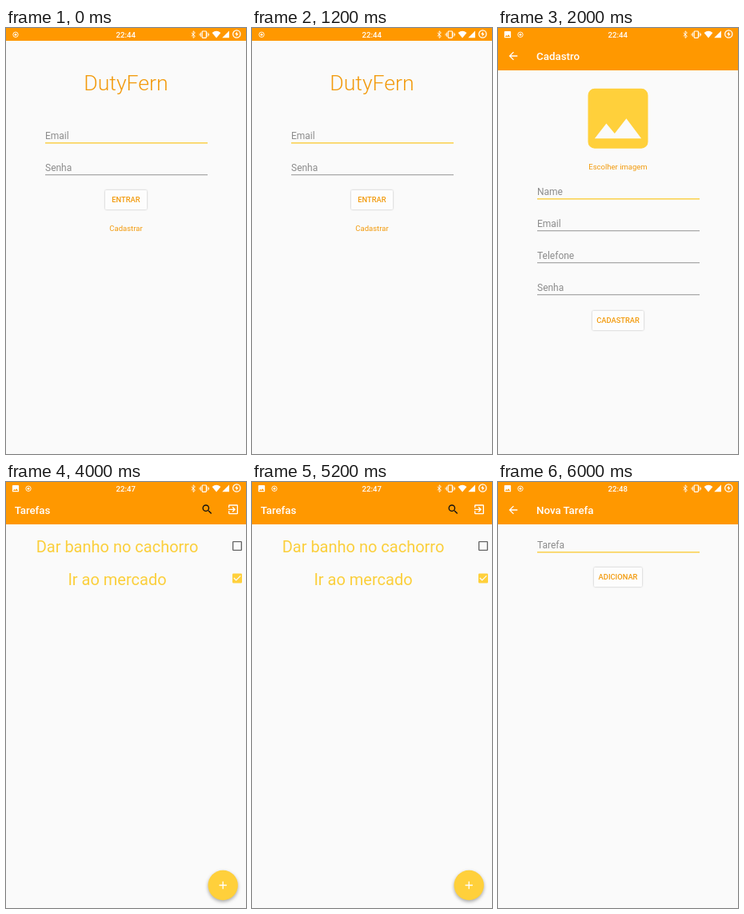
Recreate the animation shown at these times as an HTML page. Size 300 by 533 pixels, loop 8000 ms.

```html
<!DOCTYPE html>
<html lang="pt">
<head>
<meta charset="utf-8">
<title>Tarefas</title>
<style>
  html, body { margin: 0; height: 100%; overflow: hidden; background: #fafafa; }
  svg { display: block; width: 100%; height: 100%; font-family: Roboto, sans-serif; }
  .mid { text-anchor: middle; }
  .accent { fill: #f29a0c; }
  .bold { font-weight: 500; }
  .bar { fill: #fff; font-size: 13.33px; font-weight: 500; }
  .hint { fill: #8c8c8c; font-size: 12px; }
  .task { fill: #fbcf3c; font-size: 20px; }
  .small { font-size: 9.5px; }
  .button { filter: drop-shadow(0 .8px .8px #0004); }
  .fab { filter: drop-shadow(0 2px 2px #0005); }
</style>
</head>
<body>
<svg id="stage" viewBox="0 0 300 533"></svg>
<script>
const YELLOW = '#ffd03b';
const PATHS = {
  back: 'M20 11H7.83l5.59-5.59L12 4l-8 8 8 8 1.41-1.41L7.83 13H20z',
  search: 'M15.5 14h-.79l-.28-.27A6.47 6.47 0 0 0 16 9.5 6.5 6.5 0 1 0 9.5 16c1.61 0 3.09-.59 4.23-1.57l.27.28v.79l5 4.99L20.49 19zm-6 0a4.5 4.5 0 1 1 0-9 4.5 4.5 0 0 1 0 9z',
  exit: 'M10.09 15.59L11.5 17l5-5-5-5-1.41 1.41L12.67 11H3v2h9.67zM19 3H5a2 2 0 0 0-2 2v4h2V5h14v14H5v-4H3v4a2 2 0 0 0 2 2h14a2 2 0 0 0 2-2V5a2 2 0 0 0-2-2z',
  box: 'M19 5v14H5V5zm0-2H5a2 2 0 0 0-2 2v14a2 2 0 0 0 2 2h14a2 2 0 0 0 2-2V5a2 2 0 0 0-2-2z',
  checked: 'M19 3H5a2 2 0 0 0-2 2v14a2 2 0 0 0 2 2h14a2 2 0 0 0 2-2V5a2 2 0 0 0-2-2zm-9 14l-5-5 1.41-1.41L10 14.17l7.59-7.59L19 8z',
  image: 'M21 19V5a2 2 0 0 0-2-2H5a2 2 0 0 0-2 2v14a2 2 0 0 0 2 2h14a2 2 0 0 0 2-2zM8.5 13.5l2.5 3.01L14.5 12l4.5 6H5z',
  plus: 'M19 13h-6v6h-2v-6H5v-2h6V5h2v6h6z'
};

const icon = (name, x, y, fill = '#fff', size = 16) =>
  `<path d="${PATHS[name]}" fill="${fill}" transform="translate(${x - size / 2} ${y - size / 2}) scale(${size / 24})"/>`;
const text = (s, x, y, cls, extra = '') => `<text x="${x}" y="${y}" class="${cls}" ${extra}>${s}</text>`;
const rect = (x, y, w, h, fill, extra = '') =>
  `<rect x="${x}" y="${y}" width="${w}" height="${h}" fill="${fill}" ${extra}/>`;

const field = (label, y, focus) => text(label, 49, y - 4.7, 'hint') +
  (focus ? rect(49, y - .8, 203, 1.33, '#fbcb33') : rect(49, y - .6, 203, .8, '#777'));
const button = (label, y, w) =>
  rect(150 - w / 2, y, w, 24, '#fdfdfd', 'rx="1.3" class="button"') +
  text(label, 150, y + 15.4, 'mid accent bold', 'font-size="9.33"');
const recorder = x => `<circle cx="${x}" cy="8.3" r="3.2" fill="none" stroke="#fff" stroke-width=".9"/>
  <circle cx="${x}" cy="8.3" r="1.4" fill="#fff"/>`;

const status = (time, photo) => rect(0, 0, 300, photo ? 53 : 16, '#ff9800') +
  (photo ? icon('image', 12, 8.2, '#fff', 11) + recorder(28) : recorder(12)) +
  text(time, 149.7, 11.6, 'mid bold', 'fill="#fff" font-size="9.6"') + `
  <g fill="none" stroke="#fff" stroke-width=".9">
    <path d="M231.8 6l4.6 4.3-2.3 2.2V3.8l2.3 2.2-4.6 4.3"/>
    <rect x="245.2" y="4" width="5.2" height="8.4" rx=".8" stroke-width="1.2"/>
    <path d="M243.6 5.5v5.4M252 5.5v5.4M242.1 6.8v2.8M253.5 6.8v2.8"/>
    <circle cx="288.3" cy="7.5" r="4.6" stroke-width="1.3"/>
  </g>
  <path fill="#fff" d="M257.6 6Q263 1.7 268.4 6L263 12.6zM270.2 12.3h8.8V3.5zM288.9 4.4l-2.8 3.7h1.7v2.6l2.8-3.8h-1.7z"/>`;
const header = (time, title) => status(time, true) + icon('back', 19, 35) + text(title, 48, 39.8, 'bar');

const screens = [
  status('22:44', false) +
    text('DutyFern', 150, 77.7, 'mid accent', 'font-size="26.67" font-weight="300"') +
    field('Email', 144, true) + field('Senha', 184) +
    button('ENTRAR', 203, 52) + text('Cadastrar', 150, 254.3, 'mid accent small'),

  header('22:44', 'Cadastro') + icon('image', 150, 113.3, YELLOW, 100) +
    text('Escolher imagem', 150, 176.6, 'mid accent small') +
    ['Name', 'Email', 'Telefone', 'Senha'].map((s, i) => field(s, 214 + 40 * i, !i)).join('') +
    button('CADASTRAR', 354, 64),

  status('22:47', true) + text('Tarefas', 10.7, 39.8, 'bar') +
    icon('search', 251.5, 34.3, '#111') + icon('exit', 284, 34.3) +
    text('Dar banho no cachorro', 139, 88.3, 'mid task') + icon('box', 289, 80, '#666') +
    text('Ir ao mercado', 139, 128.8, 'mid task') + icon('checked', 289, 120.5, YELLOW) +
    `<circle cx="271.2" cy="504.5" r="18.67" fill="${YELLOW}" class="fab"/>` + icon('plus', 271.2, 504.5),

  header('22:48', 'Nova Tarefa') + field('Tarefa', 88, true) + button('ADICIONAR', 107, 60)
];

const stage = document.getElementById('stage');
stage.innerHTML = screens.map(s => `<g display="none">${s}</g>`).join('');

function draw() {
  const now = Math.floor(performance.now() % 8000 / 2000);
  [...stage.children].forEach((g, i) => g.setAttribute('display', i === now ? 'inline' : 'none'));
  requestAnimationFrame(draw);
}
draw();
</script>
</body>
</html>
```
